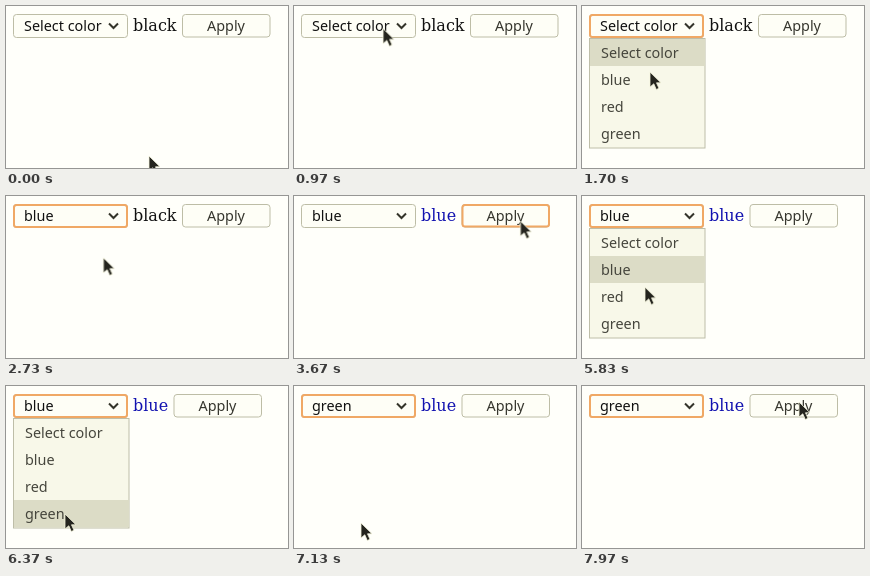
These frames come from a looping animation (282 px wide and 162 px high, 8000 ms). An HTML page:

```html
<!DOCTYPE html>
<html lang="en">
<head>
<meta charset="utf-8">
<title>Color select</title>
<style>
  html, body { margin: 0; width: 100%; height: 100%; overflow: hidden; background: #fffffa; }
  svg { display: block; width: 282px; height: 162px; }
  text { font: 14.4px "Noto Sans", sans-serif; fill: #111; }
  .word { font: 16px "DejaVu Serif", serif; }
  .box { fill: #fefef6; stroke: #bdbda6; }
  .ring { fill: none; stroke: #f0a865; stroke-width: 2; }
  .menu text { fill: #45453c; }
  .button text { fill: #36362e; text-anchor: middle; }

  /* Interface states switch hard; only the pointer glides. */
  .state { animation: 8s step-end infinite; }
  .pick-none { animation-name: pickNone; }
  .pick-blue { animation-name: pickBlue; }
  .pick-green { animation-name: pickGreen; }
  .word-black { animation-name: wordBlack; }
  .word-blue { animation-name: wordBlue; }
  .select-focus { animation-name: selectFocus; }
  .button-focus { animation-name: buttonFocus; }
  .menu { animation-name: menu; }
  .hover { animation-name: hover; }
  .button { animation-name: button; }
  .pointer { animation: pointer 8s linear infinite; }

  @keyframes pickNone { 0% { visibility: visible } 29.375%, 100% { visibility: hidden } }
  @keyframes pickBlue { 0%, 80%, 100% { visibility: hidden } 29.375% { visibility: visible } }
  @keyframes pickGreen { 0% { visibility: hidden } 80%, 100% { visibility: visible } }
  @keyframes wordBlack { 0% { visibility: visible } 43.125%, 100% { visibility: hidden } }
  @keyframes wordBlue { 0% { visibility: hidden } 43.125%, 100% { visibility: visible } }
  @keyframes selectFocus {
    0%, 43.125% { visibility: hidden }
    15%, 60.875%, 100% { visibility: visible }
  }
  @keyframes buttonFocus { 0%, 60.875%, 100% { visibility: hidden } 43.125% { visibility: visible } }
  @keyframes menu {
    0%, 29.375%, 80%, 100% { visibility: hidden }
    15%, 60.875% { visibility: visible }
  }
  @keyframes hover {
    0% { transform: none }
    22.25% { transform: translateY(27px) }
    73.75% { transform: translateY(54px) }
    76.875%, 100% { transform: translateY(81px) }
  }
  @keyframes button { 0% { transform: none } 43.125%, 100% { transform: translateX(-8.5px) } }
  @keyframes pointer {
    0% { transform: translate(143px, 150px); animation-timing-function: ease-in-out }
    13.5%, 16% { transform: translate(88px, 20px) }
    21.25% { transform: translate(68px, 66px); animation-timing-function: ease-out }
    25%, 29.5% { transform: translate(64px, 74px) }
    34.125% { transform: translate(97px, 62px); animation-timing-function: ease-out }
    41.25%, 43.5% { transform: translate(222px, 19px); animation-timing-function: ease-in-out }
    48%, 52.5% { transform: translate(230px, 30px); animation-timing-function: ease-in-out }
    58.375%, 61.5% { transform: translate(104px, 11px); animation-timing-function: ease-in }
    72.875% { transform: translate(63px, 91px); animation-timing-function: ease-out }
    78%, 80.5% { transform: translate(59px, 128px) }
    89.125%, 91.5% { transform: translate(67px, 137px); animation-timing-function: ease-in-out }
    99.625%, 100% { transform: translate(217px, 16px) }
  }
</style>
</head>
<body>
<svg viewBox="0 0 282 162">
  <rect class="box" x="7.5" y="8.5" width="114" height="23" rx="3"/>
  <rect class="ring state select-focus" x="8" y="9" width="113" height="22" rx="2.5"/>
  <text class="state pick-none" x="18" y="25">Select color</text>
  <text class="state pick-blue" x="18" y="25">blue</text>
  <text class="state pick-green" x="18" y="25">green</text>
  <path d="M103 17.5l4.5 4.5 4.5-4.5" fill="none" stroke="#34342a" stroke-width="2"/>

  <text class="word state word-black" x="127" y="25">black</text>
  <text class="word state word-blue" x="127" y="25" style="fill:#1212b0">blue</text>

  <g class="button state">
    <rect class="box" x="176.5" y="8.5" width="87.5" height="22.5" rx="3"/>
    <rect class="ring state button-focus" x="177" y="9" width="86.5" height="21.5" rx="2.5"/>
    <text x="220" y="25">Apply</text>
  </g>

  <g class="menu state">
    <rect x="7.5" y="32.5" width="115.5" height="109.5" fill="#f8f8e9" stroke="#bebea8"/>
    <rect class="hover state" x="8" y="33" width="115" height="27" fill="#dcdcc6"/>
    <text x="19" y="52">Select color</text>
    <text x="19" y="79">blue</text>
    <text x="19" y="106">red</text>
    <text x="19" y="133">green</text>
  </g>

  <g class="pointer">
    <path d="M0 0V15L3.8 11.8 6.3 17.5 9 16.3 6.5 10.8H11Z" fill="#24241e" stroke="#f4f4dc" stroke-width=".8"/>
  </g>
</svg>
</body>
</html>
```
